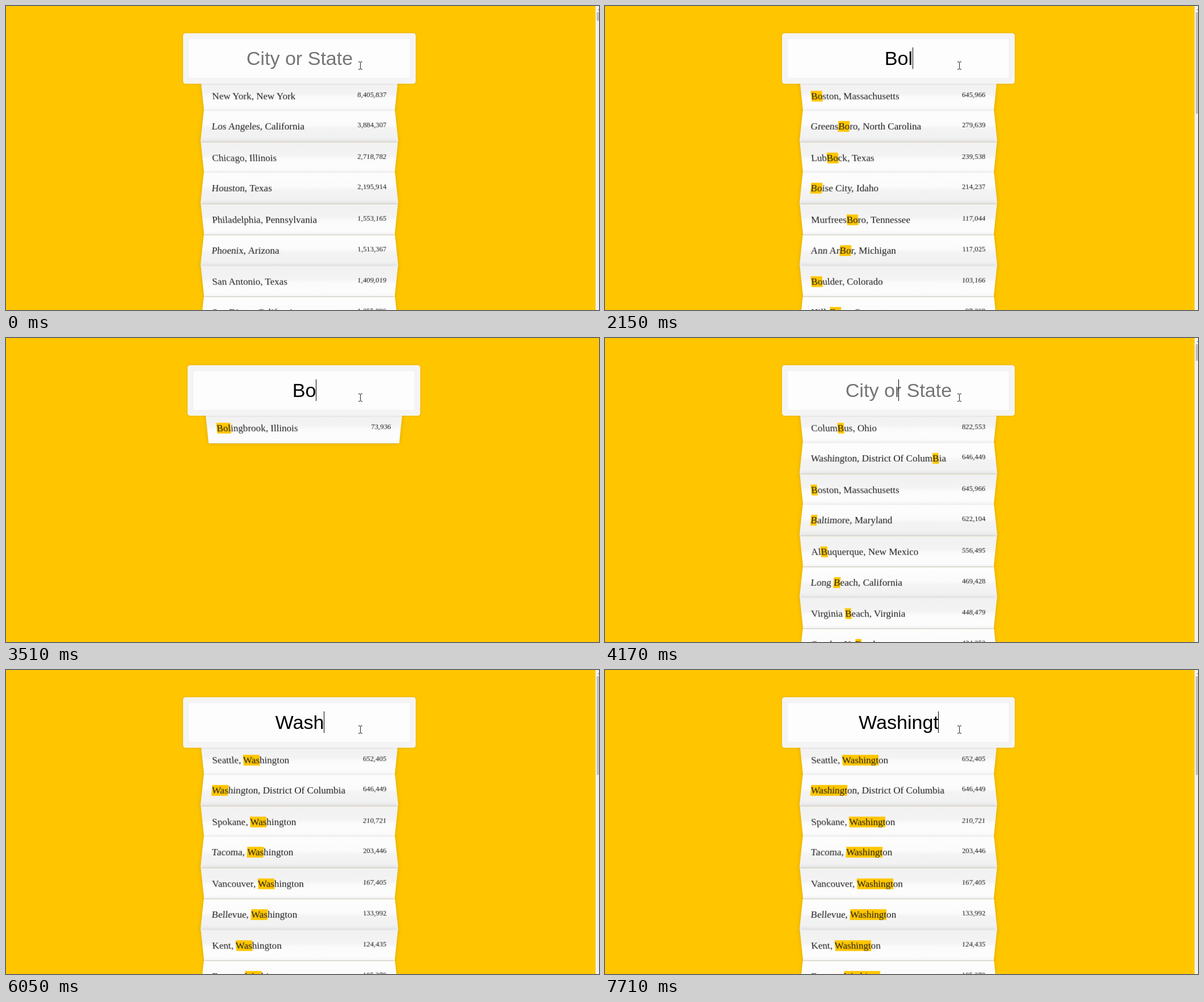
Write an HTML page that moves like this. It is 1045x536 px and loops after 8000 ms.

```html
<!DOCTYPE html>
<html lang="en">
<head>
<meta charset="utf-8">
<title>Type ahead</title>
<style>
* { box-sizing: border-box; }
html, body { margin: 0; width: 100%; height: 100%; overflow: hidden; background: #ffc600; }
#stage { position: fixed; inset: 0; overflow: clip; contain: strict; }
#page { position: absolute; top: 0; left: 0; width: 1035px; height: 100%; }
#field {
  position: absolute; z-index: 2; left: 312px; top: 48px; width: 410px; height: 89px; padding-left: 1px;
  border: 9px solid #f4f4f4; border-radius: 4.5px; background: #fdfdfd;
  box-shadow: 0 0 4px rgba(0,0,0,.12), inset 0 0 2px rgba(0,0,0,.19);
  font: 34.1px/70px "Liberation Sans", Arial, sans-serif; text-align: center; white-space: pre;
}
#caret { position: absolute; top: 73px; width: 1px; height: 38px; background: #000; z-index: 3; }
#list {
  position: absolute; left: 346.1px; top: 128.7px; width: 341.6px; margin: 0; padding: 0; list-style: none;
  font: 17.08px "Liberation Serif", "Times New Roman", serif; color: #1a1a1a;
}
li {
  display: flex; justify-content: space-between; height: 54.6px; padding: 17.9px 17.08px 0;
  border-bottom: 1px solid #d8d8d8; box-shadow: 0 0 8.5px rgba(0,0,0,.14); white-space: nowrap;
}
li:nth-child(odd) {
  transform: perspective(85.4px) rotateX(-3deg) translateY(2.56px);
  background: linear-gradient(#f1f1f1, #f3f3f3 42%, #fbfbfb 54%, #fdfdfd);
}
li:nth-child(even) {
  transform: perspective(85.4px) rotateX(3deg) translateY(1.7px) scale(1.001);
  background: linear-gradient(#fdfdfd, #fbfbfb 46%, #f3f3f3 58%, #f1f1f1);
}
li small { font-size: 12.81px; }
mark { background: #ffc600; color: inherit; }
#bar { position: absolute; left: 1039px; top: 0; width: 6px; height: 100%; background: #f1f1f1; overflow: hidden; }
#bar svg { position: absolute; left: 4px; top: 4px; }
#thumb { position: absolute; left: 2px; top: 11px; width: 4px; background: #c1c1c1; }
#mouse { position: absolute; left: 620px; top: 97px; z-index: 4; }
</style>
</head>
<body>
<div id="stage">
  <div id="page">
    <div id="field"><span id="value"></span></div>
    <div id="caret"></div>
    <ul id="list"></ul>
  </div>
  <div id="bar">
    <svg width="7" height="3"><path d="M0 3L3.5 0L7 3" fill="#505050"/></svg>
    <div id="thumb"></div>
  </div>
  <svg id="mouse" width="9" height="16"><path d="M1 1.5H4M5 1.5H8M4.5 2V14M1 14.5H4M5 14.5H8" fill="none" stroke="#222"/></svg>
</div>
<script>
const LOOP = 8000, CENTER = 517.5;

// Sorted by population
const cities = `New York, New York|8,405,837
Los Angeles, California|3,884,307
Chicago, Illinois|2,718,782
Houston, Texas|2,195,914
Philadelphia, Pennsylvania|1,553,165
Phoenix, Arizona|1,513,367
San Antonio, Texas|1,409,019
San Diego, California|1,355,896
Columbus, Ohio|822,553
Fort Worth, Texas|792,727
Seattle, Washington|652,405
Washington, District Of Columbia|646,449
Boston, Massachusetts|645,966
Baltimore, Maryland|622,104
Milwaukee, Wisconsin|599,164
Albuquerque, New Mexico|556,495
Long Beach, California|469,428
Virginia Beach, Virginia|448,479
Omaha, Nebraska|434,353
Wichita, Kansas|386,552
New Orleans, Louisiana|378,715
Honolulu, Hawaii|347,884
Greensboro, North Carolina|279,639
Newark, New Jersey|278,427
Fort Wayne, Indiana|256,496
Lubbock, Texas|239,538
Boise City, Idaho|214,237
Spokane, Washington|210,721
Des Moines, Iowa|207,510
Tacoma, Washington|203,446
Vancouver, Washington|167,405
Bellevue, Washington|133,992
Kent, Washington|124,435
Murfreesboro, Tennessee|117,044
Ann Arbor, Michigan|117,025
Everett, Washington|105,370
Boulder, Colorado|103,166
Hillsboro, Oregon|97,368
Bolingbrook, Illinois|73,936`.split("\n").map(line => line.split("|"));

// Bottom of the scrollbar thumb per query; 0 hides the bar
const thumbEnds = { "": 26, B: 40, Bo: 190, Bol: 0, W: 34, Wa: 95 };

// time, typed text, query shown in the list, caret visible
const steps = [
  [0, "", "", 0], [530, "", "", 1],
  [1090, "B", "B", 1], [1520, "Bo", "B", 1], [1670, "Bo", "Bo", 1],
  [2100, "Bol", "Bo", 1], [2240, "Bol", "Bol", 1], [2620, "Bol", "Bol", 0], [3110, "Bol", "Bol", 1],
  [3510, "Bo", "Bol", 1], [3600, "Bo", "Bo", 1], [3660, "Bo", "Bo", 0],
  [3900, "B", "Bo", 0], [4050, "B", "B", 1], [4170, "", "B", 1],
  [4720, "W", "", 1], [5250, "Wa", "W", 1], [5290, "Wa", "Wa", 1],
  [5520, "Was", "Wa", 1], [5620, "Was", "Was", 1],
  [6050, "Wash", "Was", 1], [6180, "Wash", "Wash", 1],
  [6380, "Washi", "Wash", 1], [6500, "Washi", "Washi", 1], [6900, "Washi", "Washi", 0],
  [7050, "Washin", "Washi", 1], [7200, "Washin", "Washin", 1],
  [7250, "Washing", "Washin", 1], [7380, "Washing", "Washing", 1],
  [7590, "Washingt", "Washing", 1], [7710, "Washingt", "Washingt", 1]
];

const $ = id => document.getElementById(id);

function renderList(query) {
  const match = new RegExp(query, "gi");
  const highlight = name => query ? name.replace(match, `<mark>${query}</mark>`) : name;
  $("list").innerHTML = cities
    .filter(([name]) => name.toLowerCase().includes(query.toLowerCase()))
    .slice(0, 8)
    .map(([name, count]) => `<li><span>${highlight(name)}</span><small>${count}</small></li>`)
    .join("");
}

function render([, text, query, caret]) {
  const end = thumbEnds[query] ?? 185;
  $("page").style.left = end ? 0 : "8px";
  $("bar").style.display = end ? "block" : "none";
  $("thumb").style.height = Math.max(0, end - 11) + "px";

  const value = $("value");
  value.textContent = text || "City or State";
  value.style.color = text ? "#000" : "#757575";
  const half = text ? value.getBoundingClientRect().width / 2 : 0;
  $("caret").style.left = Math.floor(CENTER + half) + "px";
  $("caret").style.display = caret ? "block" : "none";
  renderList(query);
}

let shown;
function frame() {
  const t = performance.now() % LOOP;
  const step = steps.findLast(s => s[0] <= t);
  if (step !== shown) render(shown = step);
  requestAnimationFrame(frame);
}
frame();
</script>
</body>
</html>
```
